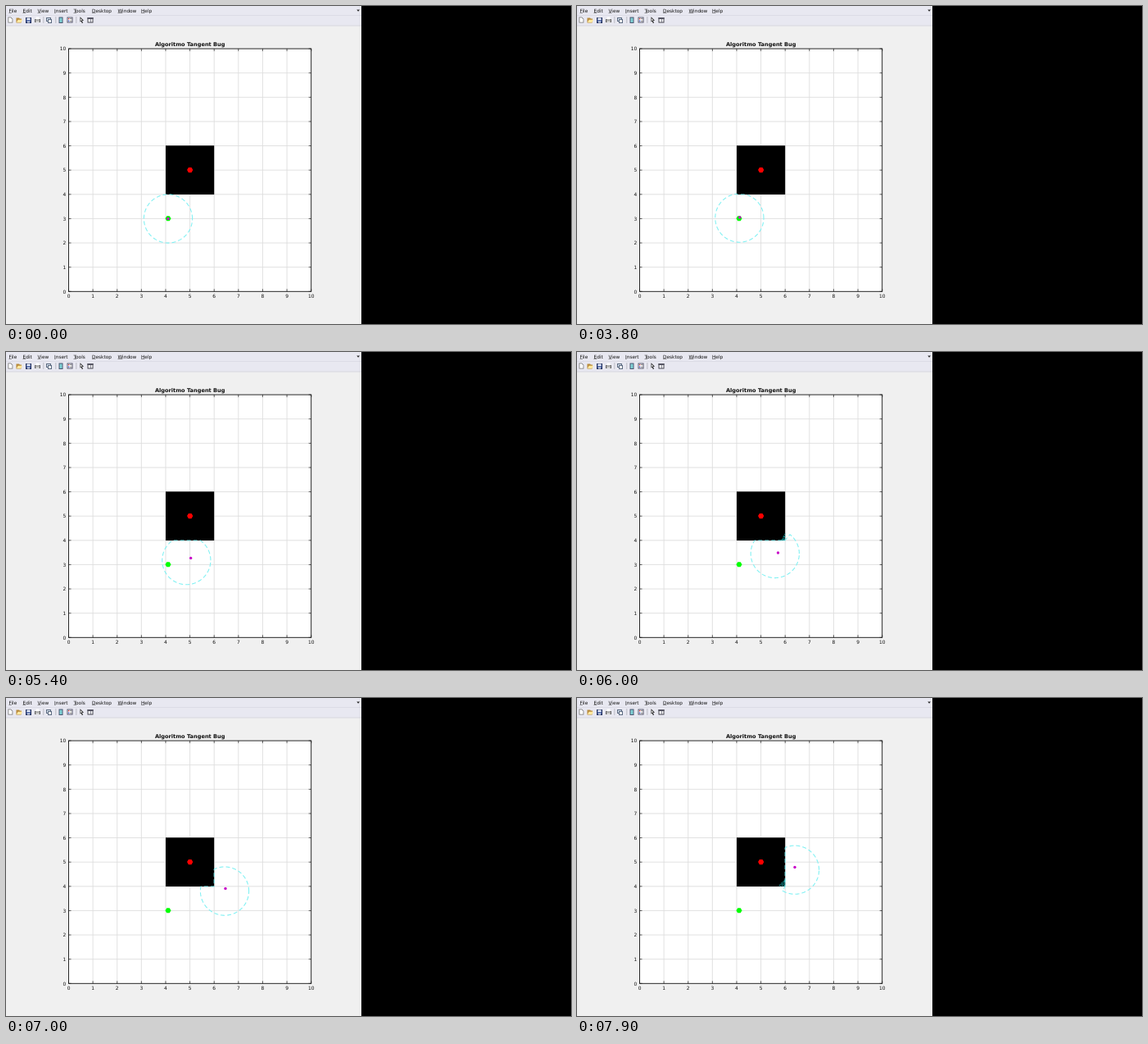
An HTML page with a canvas for the animation above (8000 ms loop, 690x388 px).

```html
<!DOCTYPE html>
<html lang="en">
<head>
<meta charset="utf-8">
<title>Algoritmo Tangent Bug</title>
<style>
  html, body { margin: 0; width: 100%; height: 100%; overflow: hidden; background: #000; }
  canvas { display: block; }
</style>
</head>
<body>
<canvas id="stage" width="690" height="388"></canvas>
<script>
const ctx = document.getElementById('stage').getContext('2d');
const LOOP = 8000, STEP = 100, RANGE = 29.6;
const PLOT = { x: 76.5, y: 348.3, unit: 29.62 };
const BLOCK = { l: 195, t: 170.3, r: 254.2, b: 230 };
const FONT = '"DejaVu Sans", sans-serif';

// Sensor centre over time: [ms, x, y]
const PATH = [
  [3700, 198, 259.5], [3800, 198.4, 258.6], [4700, 201.8, 252.4], [4900, 202.6, 251.8],
  [5100, 206, 255], [5300, 215, 257], [5600, 231, 248.6], [5800, 234.5, 247.4],
  [6000, 241.8, 246], [6100, 245.5, 245], [6400, 253.5, 243.4], [6600, 258.8, 241.8],
  [7000, 267, 235.6], [7100, 268, 232.5], [7300, 270, 226], [7500, 269, 219],
  [7700, 267.3, 212.8], [7900, 266, 209.7], [8000, 266, 206.5]
];
const HOLDS = [5000, 5700, 7800];

const px = v => PLOT.x + v * PLOT.unit;
const py = v => PLOT.y - v * PLOT.unit;

function rect(x, y, w, h, color) {
  ctx.fillStyle = color;
  ctx.fillRect(x, y, w, h);
}

function line(x1, y1, x2, y2, color, width = 1) {
  ctx.strokeStyle = color;
  ctx.lineWidth = width;
  ctx.beginPath();
  ctx.moveTo(x1, y1);
  ctx.lineTo(x2, y2);
  ctx.stroke();
}

function shape(points, color) {
  ctx.fillStyle = color;
  ctx.beginPath();
  points.forEach(([x, y]) => ctx.lineTo(x, y));
  ctx.fill();
}

function text(str, x, y, size, align = 'left', weight = '') {
  ctx.font = `${weight} ${size}px ${FONT}`;
  ctx.textAlign = align;
  ctx.fillStyle = '#111';
  ctx.fillText(str, x, y);
}

function dot(x, y, r, color) {
  ctx.fillStyle = color;
  ctx.beginPath();
  ctx.arc(x, y, r, 0, Math.PI * 2);
  ctx.fill();
}

function hexagon(x, y, r, color) {
  shape(Array.from({ length: 6 }, (_, i) =>
    [x + r * Math.cos(i * Math.PI / 3), y + r * Math.sin(i * Math.PI / 3)]), color);
}

function frame(x, y, w, h, fill, edge) {
  rect(x, y, w, h, edge);
  rect(x + 1, y + 1, w - 2, h - 2, fill);
}

function drawMenu() {
  rect(0, 0, 434, 24, '#e8e8f1');
  rect(0, 11, 434, 1, '#dcdce6');
  rect(0, 23.5, 434, 1, '#d8d8df');
  const menu = { File: 3.5, Edit: 20.5, View: 38.5, Insert: 59, Tools: 82.5, Desktop: 105, Window: 136.5, Help: 165 };
  for (const [name, x] of Object.entries(menu)) {
    text(name, x, 7.6, 5.8);
    rect(x, 8.4, ctx.measureText(name[0]).width, 0.6, '#555');
  }
  shape([[428.3, 4.5], [432, 4.5], [430.1, 6.8]], '#222');
}

function drawToolbar() {
  shape([[2.5, 13.5], [6, 13.5], [8.3, 16], [8.3, 20.5], [2.5, 20.5]], '#777');
  shape([[3.3, 14.3], [5.7, 14.3], [7.5, 16.2], [7.5, 19.7], [3.3, 19.7]], '#fff');
  shape([[12.5, 14.5], [16, 14.5], [17, 15.5], [19, 15.5], [18.5, 20.5], [12.5, 20.5]], '#b88a3a');
  shape([[14.5, 16.8], [20.2, 16.8], [18.2, 20], [13, 20]], '#ffe9a0');
  frame(24, 14, 7, 7, '#5369a8', '#27345f');
  rect(25.5, 14.5, 4, 2.5, '#e8edf8');
  rect(26, 18.5, 3, 2, '#c8cfdf');
  frame(35, 16, 7, 4, '#aaa', '#666');
  rect(36.5, 13.5, 4, 3, '#fff');
  rect(36.5, 18.5, 4, 2, '#ddd');
  [45.5, 60.5, 85.5].forEach(x => rect(x, 13, 0.7, 8, '#aaaab3'));
  frame(49, 14, 6, 5, '#d5e0ed', '#5b6a80');
  frame(51, 16, 5, 5, '#f6f6f6', '#5b6a80');
  frame(64.5, 13.5, 5, 7.5, '#7fd2d5', '#4a5570');
  frame(74.5, 13.5, 7, 7, '#fff', '#55556a');
  rect(76, 15, 1.3, 1.3, '#d33');
  rect(76, 17.5, 1.3, 1.3, '#34c');
  rect(78, 15.3, 2.5, 0.8, '#666');
  rect(78, 17.8, 2.5, 0.8, '#666');
  shape([[90.5, 13.2], [95, 17.8], [92.9, 18], [94, 20.7], [92.8, 21], [91.8, 18.5], [90.5, 19.6]], '#222');
  shape([[91.2, 15], [93.2, 17.2], [91.2, 18]], '#fff');
  frame(99.5, 14, 7, 6.5, '#fff', '#44444f');
  rect(99.5, 14, 7, 2, '#555563');
  rect(103, 16, 0.8, 4, '#667');
}

function drawAxes() {
  const [l, r, b, t] = [px(0), px(10), py(0), py(10)];
  rect(l, t, r - l, b - t, '#fff');
  for (let i = 1; i < 10; i++) {
    line(px(i), t, px(i), b, '#dedede', 0.9);
    line(l, py(i), r, py(i), '#dedede', 0.9);
  }
  for (let i = 0; i <= 10; i++) {
    const x = px(i), y = py(i);
    line(x, b, x, b - 3, '#222', 0.7);
    line(x, t, x, t + 3, '#222', 0.7);
    line(l, y, l + 3, y, '#222', 0.7);
    line(r, y, r - 3, y, '#222', 0.7);
    text(i, x, 356.4, 5.9, 'center');
    text(i, 73.2, y + 2.2, 5.9, 'right');
  }
  ctx.strokeStyle = '#111';
  ctx.lineWidth = 0.9;
  ctx.strokeRect(l, t, r - l, b - t);
  text('Algoritmo Tangent Bug', 224.7, 48.6, 6.6, 'center', 'bold');
}

function position(t) {
  t = Math.max(t, PATH[0][0]);
  const i = Math.max(1, PATH.findIndex(k => k[0] >= t));
  const [a, b] = [PATH[i - 1], PATH[i]];
  const f = (t - a[0]) / (b[0] - a[0]);
  return [a[1] + (b[1] - a[1]) * f, a[2] + (b[2] - a[2]) * f];
}

// Distances at which a ray enters and leaves the block.
function castRay(x, y, dx, dy) {
  const slab = (lo, hi, o, d) => [(lo - o) / d, (hi - o) / d].sort((a, b) => a - b);
  const [x1, x2] = slab(BLOCK.l, BLOCK.r, x, dx);
  const [y1, y2] = slab(BLOCK.t, BLOCK.b, y, dy);
  const near = Math.max(x1, y1), far = Math.min(x2, y2);
  return near > 0 && near < far && near < RANGE ? [near, far] : null;
}

function drawSensor(x, y) {
  const outline = [], leaks = [];
  for (let deg = 0; deg < 360; deg++) {
    const a = (deg + 0.01) * Math.PI / 180;
    const dx = Math.cos(a), dy = -Math.sin(a);
    const hit = castRay(x, y, dx, dy);
    const at = d => [x + dx * d, y + dy * d];
    outline.push(at(hit ? hit[0] : RANGE));
    if (hit && hit[1] < RANGE && deg % 3 === 0) leaks.push([at(hit[0]), at(hit[1])]);
  }
  ctx.setLineDash([3, 1]);
  leaks.forEach(([p, q]) => line(...p, ...q, '#19b5b5', 0.9));
  ctx.setLineDash([5, 3]);
  ctx.strokeStyle = '#83f1f3';
  ctx.lineWidth = 1.1;
  ctx.beginPath();
  outline.forEach(p => ctx.lineTo(...p));
  ctx.closePath();
  ctx.stroke();
  ctx.setLineDash([]);
}

function draw(now) {
  let t = Math.floor((now % LOOP) / STEP) * STEP;
  if (HOLDS.includes(t)) t -= STEP;
  rect(0, 0, 690, 388, '#000');
  rect(0, 0, 434, 388, '#f0f0f0');
  drawMenu();
  drawToolbar();
  drawAxes();
  rect(BLOCK.l, BLOCK.t, BLOCK.r - BLOCK.l, BLOCK.b - BLOCK.t, '#000');
  drawSensor(...position(t));
  hexagon(224.7, 200.1, 3.6, '#f00');
  hexagon(198, 259.3, 3.5, '#0f0');
  dot(...position(t + STEP), 1.7, '#c800c8');
}

const start = performance.now();
function tick() {
  draw(performance.now() - start);
  requestAnimationFrame(tick);
}
tick();
</script>
</body>
</html>
```
